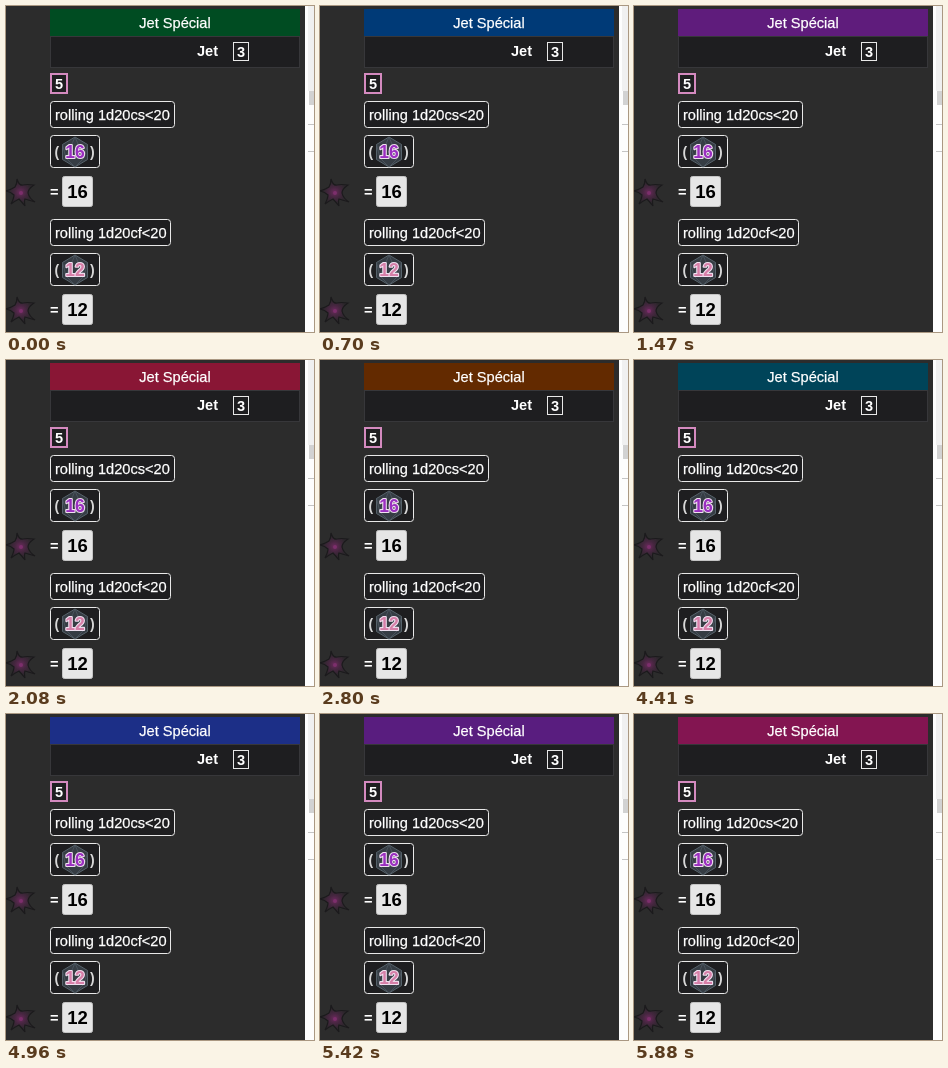
Recreate the animation shown at these times as an HTML page. Size 308 px wide and 326 px high, loop 5960 ms.

```html
<!DOCTYPE html>
<html lang="fr">
<head>
<meta charset="utf-8">
<title>Jet Spécial</title>
<style>
  html, body { margin: 0; width: 308px; height: 326px; overflow: hidden; background: #2c2c2c; }
  svg { display: block; font: 14.6px "Liberation Sans", Arial, sans-serif; fill: #fff; }
  .bold { font-weight: bold; }
  .mid { text-anchor: middle; }
  .plain { stroke: #fff; stroke-width: .25px; }
  .frame { fill: #1e1e20; stroke: #e8e8e8; }
  .paren { font-size: 14px; font-weight: bold; fill: #d8d8d8; }
  .total { font: bold 18.5px "Liberation Sans", Arial, sans-serif; fill: #000; }
  .rolled { font: bold 17.5px "Liberation Sans", Arial, sans-serif; stroke: #f0e0f0; stroke-width: 2.2px; stroke-linejoin: round; paint-order: stroke; }
</style>
</head>
<body>
<svg width="308" height="326" viewBox="0 0 308 326">
  <defs>
    <radialGradient id="glow">
      <stop offset="0" stop-color="#6a2a5c"/>
      <stop offset=".4" stop-color="#45263f"/>
      <stop offset=".8" stop-color="#2b272b"/>
    </radialGradient>
    <g id="star">
      <path d="M-4-13Q-2-6 2-7Q6-8 13-7Q7-3 7 1Q8 6 14 10Q7 8 4 7Q3 9 4 14Q0 9-2 7Q-6 9-10 12Q-7 6-7 3Q-10 0-15-1Q-9-3-6-5Q-4-8-4-13Z" fill="url(#glow)" stroke="#1b1a1c" stroke-width="1.2"/>
      <circle r="2" cy="1" fill="#7c2f6c"/>
    </g>
    <g id="die">
      <path d="M0-15L12.5-7.5V7.5L0 15L-12.5 7.5V-7.5Z" fill="#363d44" stroke="#56626a"/>
      <path d="M0-15L-9 6H9ZM-12.5-7.5L-9 6L0 15L9 6L12.5-7.5" fill="none" stroke="#4e5962" stroke-width=".8"/>
    </g>
  </defs>

  <rect width="308" height="326" fill="#2c2c2c"/>
  <rect x="299" width="9" height="326" fill="#fdfdfd"/>
  <rect x="302" width="6" height="85" fill="#f0f0f0"/>
  <rect x="303" y="85" width="5" height="14" fill="#d2d2d2"/>
  <path d="M302 118.5H308M302 145.5H308" stroke="#c4c4c4"/>

  <rect id="header" x="44" y="3" width="250" height="27"/>
  <text class="plain mid" x="169" y="22">Jet Spécial</text>
  <rect x="44.5" y="30.5" width="249" height="31" fill="#1e1e20" stroke="#37373a"/>
  <text class="bold" x="191" y="50">Jet</text>
  <rect class="frame" x="227.5" y="36.5" width="15" height="18"/>
  <text class="bold mid" x="235" y="50.5">3</text>
  <rect x="45" y="68" width="16" height="19" fill="#1e1e20" stroke="#d48abf" stroke-width="2"/>
  <text class="bold mid" x="53" y="82.5">5</text>
  <g id="rolls"></g>
</svg>
<script>
const roll = (y, formula, boxWidth, value, color) => `
  <g transform="translate(0 ${y})">
    <rect class="frame" x="44.5" y="-.5" width="${boxWidth}" height="26" rx="3"/>
    <text class="plain" x="49" y="18">${formula}</text>
    <rect class="frame" x="44.5" y="33.5" width="49" height="32" rx="3"/>
    <text class="paren" x="48.5" y="54.5">(</text>
    <use href="#die" x="69" y="50"/>
    <text class="rolled mid" x="69" y="55.5" fill="${color}">${value}</text>
    <text class="paren" x="84" y="54.5">)</text>
    <use href="#star" x="15" y="90"/>
    <text class="bold" x="44" y="95">=</text>
    <rect x="56.5" y="74.5" width="30" height="30" rx="2" fill="#e6e6e6" stroke="#c4c4c4"/>
    <text class="total mid" x="71.5" y="96">${value}</text>
  </g>`;

document.getElementById("rolls").innerHTML =
  roll(96, "rolling 1d20cs&lt;20", 124, 16, "#9a2fc0") +
  roll(214, "rolling 1d20cf&lt;20", 120, 12, "#d67fa8");

const LOOP = 5960, TICK = 75, HUE_PERIOD = 4000;
// The hue advances in short bursts of two or three ticks, then holds.
const bursts = [0, 70, 400, 700, 930, 1160, 1390, 1700, 1930, 2250, 2490, 2730,
  3030, 3260, 3490, 3800, 4030, 4260, 4580, 4810, 5110, 5340, 5570, 5800, LOOP];

function heldTime(time) {
  const i = bursts.findIndex(start => start > time) - 1;
  const lastTick = bursts[i + 1] - bursts[i] >= 300 ? 2 : 1;
  return bursts[i] + TICK * Math.min(lastTick, Math.floor((time - bursts[i]) / TICK));
}

// Rotates the hue at constant luminance.
function hueColor(time) {
  const angle = (time / HUE_PERIOD * 360 - 100) * Math.PI / 180;
  const luma = 49, chroma = 88;
  const red = chroma * Math.sin(angle), blue = chroma * Math.cos(angle);
  const green = -(0.213 * red + 0.072 * blue) / 0.715;
  return `rgb(${[red, green, blue].map(v => Math.max(0, Math.round(luma + v)))})`;
}

const header = document.getElementById("header");
function draw() {
  header.setAttribute("fill", hueColor(heldTime(performance.now() % LOOP)));
  requestAnimationFrame(draw);
}
draw();
</script>
</body>
</html>
```
